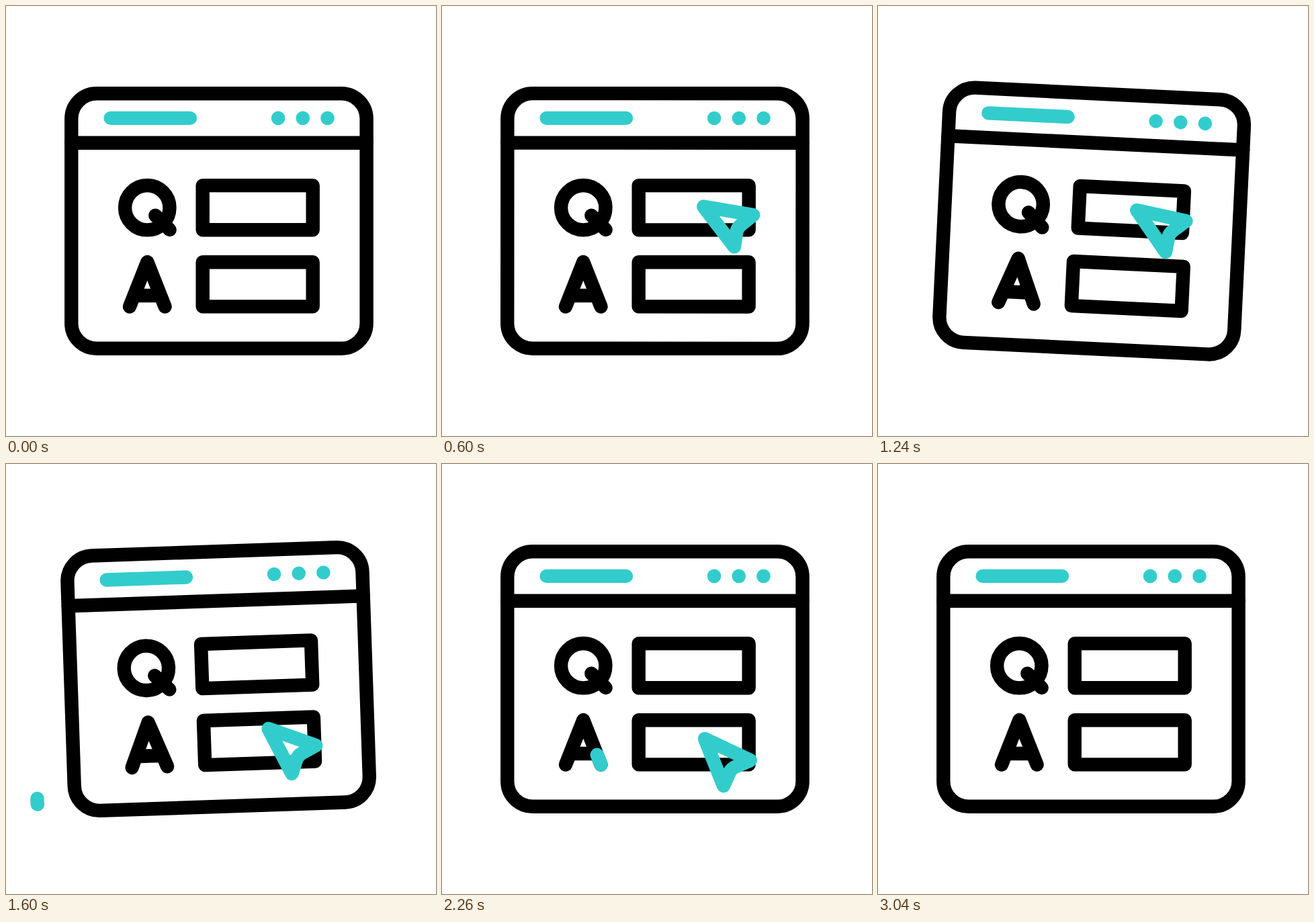
An HTML page that plays this animation: 640 px wide and 640 px high, repeating every 3.54 s.

```html
<!DOCTYPE html>
<html lang="en">
<head>
<meta charset="utf-8">
<title>Questions and answers</title>
<style>
  html, body { margin: 0; width: 100%; height: 100%; overflow: hidden; background: #fff; }
  svg { display: block; width: 640px; height: 640px; }
  svg * { vector-effect: non-scaling-stroke; }
  .line { fill: none; stroke: #000; stroke-width: 20.4; stroke-linecap: round; stroke-linejoin: round; }
  .teal { stroke: #3cc; }
  .dot { fill: #3cc; }
</style>
</head>
<body>
<svg viewBox="0 0 640 640">
  <path id="arcRight" class="line teal"/>
  <path id="arcLeft" class="line teal"/>
  <g id="window">
    <g class="line">
      <rect x="97.3" y="130.2" width="439.3" height="379.6" rx="37.5"/>
      <path d="M97.3 203.7H536.6"/>
      <circle cx="210.3" cy="300.2" r="33.2"/>
      <path d="M222.3 311.7L243.7 333.1"/>
      <path d="M184 447.5L210.3 381L236.6 447.5M196 431H225"/>
      <rect id="boxQ" x="-82" y="-33.1" width="164" height="66.2"/>
      <rect id="boxA" x="-82" y="-33.1" width="164" height="66.2"/>
    </g>
    <path class="line teal" d="M155.6 166.9H274"/>
    <g class="dot">
      <circle cx="405.1" cy="166.9" r="10.3"/>
      <circle cx="441.8" cy="166.9" r="10.3"/>
      <circle cx="478.5" cy="166.9" r="10.3"/>
    </g>
    <path id="trace" class="line teal"/>
    <path id="cursor" class="line teal" d="M-32 -34L36 -2L15 7Q7 10 4 18L-4 36Z"/>
  </g>
</svg>
<script>
const LOOP = 3540;
const el = id => document.getElementById(id);
const clamp = u => Math.min(1, Math.max(0, u));
const span = (t, a, b) => clamp((t - a) / (b - a));
const ease = (t, a, b) => (1 - Math.cos(Math.PI * span(t, a, b))) / 2;
const mix = (a, b, u) => a + (b - a) * u;
// 1 at rest, dips by depth at the middle time
const press = (t, a, mid, b, depth) => 1 - depth * (ease(t, a, mid) - ease(t, mid, b));

function tilt(t) {
  const rise = 5.5 * Math.sin(span(t, 600, 960) * Math.PI / 2);
  return rise - 7.5 * ease(t, 960, 1640) + 2 * ease(t, 1640, 2200);
}

function drawArc(id, cx, cy, from, sweep, start, end) {
  const point = u => {
    const a = (from + sweep * u) * Math.PI / 180;
    return `${cx + 103 * Math.cos(a)} ${cy + 103 * Math.sin(a)}`;
  };
  const d = end - start < 0.005 ? "" :
    `M${point(start)}A103 103 0 0 ${sweep > 0 ? 1 : 0} ${point(end)}`;
  el(id).setAttribute("d", d);
}

function drawTrace(start, end) {
  const point = u => `${184 + 52.6 * u} ${381 + 66.5 * Math.abs(2 * u - 1)}`;
  const apex = start < 0.5 && end > 0.5 ? `L${point(0.5)}` : "";
  el("trace").setAttribute("d",
    end - start < 0.005 ? "" : `M${point(start)}${apex}L${point(end)}`);
}

function place(id, x, y, scale, angle = 0) {
  el(id).setAttribute("transform", `translate(${x} ${y}) rotate(${angle}) scale(${scale})`);
}

function draw(t) {
  el("window").setAttribute("transform", `rotate(${tilt(t)} 317 345)`);
  place("boxQ", 374.7, 300.2, press(t, 820, 1080, 1350, 0.15));
  place("boxA", 374.7, 414.3, press(t, 1800, 1980, 2230, 0.15));

  const enter = ease(t, 0, 660), down = ease(t, 1200, 1720), leave = ease(t, 2380, 3180);
  const x = mix(739, 423, enter) + 288 * leave;
  const y = mix(300, 323, enter) + 120 * down - 222 * leave;
  const scale = press(t, 660, 840, 1020, 0.16) * press(t, 1720, 1880, 2040, 0.16);
  place("cursor", x, y, scale, -15.7 * (1 - ease(t, 1200, 1800)));

  drawArc("arcRight", 450.5, 494.3, 0, 105, ease(t, 760, 960), ease(t, 630, 805));
  drawArc("arcLeft", 149.5, 498, 180, -105, ease(t, 1770, 1970), ease(t, 1575, 1765));
  drawTrace(ease(t, 2010, 2330), ease(t, 1900, 2200));
}

const begin = performance.now();
function tick() {
  draw((performance.now() - begin) % LOOP);
  requestAnimationFrame(tick);
}
tick();
</script>
</body>
</html>
```
